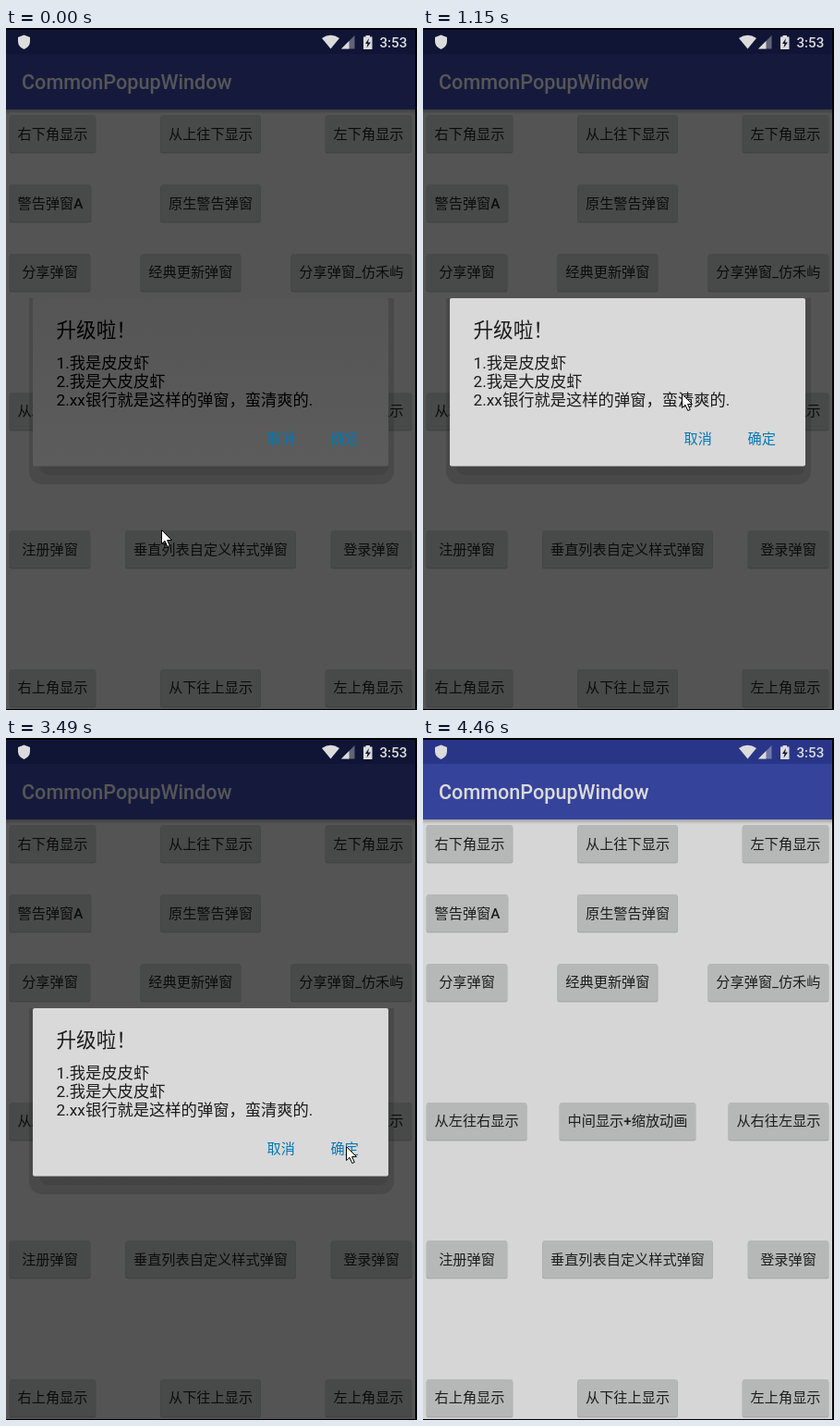
Animation of 445 by 737 pixels, one loop 5010 ms. Source, as an HTML page:

```html
<!DOCTYPE html>
<html lang="zh-CN">
<head>
<meta charset="utf-8">
<style>
  html, body { margin: 0; width: 100%; height: 100%; overflow: hidden; background: #000; }
  svg { display: block; width: 445px; height: 737px; font-family: Roboto, "Noto Sans CJK SC", "Noto Sans CJK", sans-serif; }
  .b { font-weight: 500; }
  #buttons text { font-size: 15.2px; fill: #1c1c1c; }
  #buttons rect { fill: #b6b8b8; }
  #buttons .under { fill: #000; opacity: .2; }
  #dialog text { font-size: 17.3px; }
  #dialog .title { font-size: 21.6px; }
  #dialog .action { font-size: 15.2px; fill: #0277b5; }
</style>
</head>
<body>
<svg viewBox="0 0 445 737">
  <defs>
    <linearGradient id="fall" x2="0" y2="1">
      <stop stop-opacity=".25"/><stop offset="1" stop-opacity="0"/>
    </linearGradient>
    <linearGradient id="dusk" x2="0" y2="1">
      <stop stop-color="#555"/><stop offset="1" stop-color="#5c5c5c"/>
    </linearGradient>
    <clipPath id="below"><rect y="292" width="443" height="210"/></clipPath>
  </defs>
  <rect y="2" width="443" height="734" fill="#d6d6d6"/>
  <rect y="2" width="443" height="26" fill="#293688"/>
  <rect y="28" width="443" height="60" fill="#36439b"/>
  <rect y="88" width="443" height="5" fill="url(#fall)"/>
  <text class="b" x="17" y="66" font-size="21.6" fill="#dbdbdb">CommonPopupWindow</text>
  <g id="buttons"></g>
  <rect id="dim" y="2" width="443" height="734"/>

  <g fill="#dcdcdc">
    <path d="M19.5 7.500L26 10V15Q25.500 20.500 19.500 23Q13.500 20.500 13 15V10Z"/>
    <path d="M342 11Q351.500 4.500 361 11L351.500 22.500Z"/>
    <path d="M377.500 8V22.500H363Z" opacity=".4"/>
    <path d="M371.500 14V22.500H363Z"/>
    <path d="M387 9.500H389.500V8H394V9.500H396.500V23H387Z"/>
    <path d="M393 11L389 17H391.500L390.500 21.500L395 15.500H392Z" fill="#10153a"/>
    <text class="b" x="404.500" y="21" font-size="15.1">3:53</text>
  </g>

  <g id="shadow" clip-path="url(#below)">
    <rect x="25" y="270" width="395" height="223" rx="14" opacity=".13"/>
    <rect x="36" y="280" width="378" height="203" rx="9" opacity=".08"/>
  </g>
  <g id="dialog">
    <rect x="29" y="292" width="385" height="181.500" rx="2" fill="url(#dusk)"/>
    <rect id="panel" x="29" y="292" width="385" height="181.500" rx="2" fill="#d9d9d9"/>
    <text class="title" x="54.500" y="334">升级啦！</text>
    <text x="54.500" y="368">1.我是皮皮虾</text>
    <text x="54.500" y="388">2.我是大皮皮虾</text>
    <text x="54.500" y="408">2.xx银行就是这样的弹窗，蛮清爽的.</text>
    <text class="action" x="282.500" y="449">取消</text>
    <text class="action" x="351.500" y="449">确定</text>
  </g>
  <path id="cursor" d="M.5 .5V15.500L4 12.300L6.800 18.500L9.300 17.400L6.600 11.500H11.500Z" fill="#fff" stroke="#000"/>
</svg>
<script>
const $ = id => document.getElementById(id);
const LOOP = 5010, STEP = 120;
const LEFT = 4, RIGHT = 439, PAD = 17, MIN_WIDTH = 87, ROW = 74.8;

function addButton(label, top, place) {
  const g = document.createElementNS('http://www.w3.org/2000/svg', 'g');
  const baseline = Math.round(top + 25.7), y = Math.ceil(top);
  const text = label.replace(/[A+]/, '<tspan class="b">$&</tspan>');
  g.innerHTML = `<rect class="under" rx="2.5"/><rect rx="2"/><text y="${baseline}">${text}</text>`;
  $('buttons').append(g);
  const [under, face, caption] = g.children;
  const length = caption.getComputedTextLength();
  const w = Math.max(MIN_WIDTH, length + PAD), x = place(w);
  const setBox = (el, grow, drop) => {
    const box = { x: x - grow, y: y + drop, width: w + 2 * grow, height: 40 + grow };
    for (const name in box) el.setAttribute(name, box[name]);
  };
  setBox(under, .5, 1);
  setBox(face, 0, 0);
  caption.setAttribute('x', x + (w - length) / 2);
  return { x, end: x + w };
}

// Labels spread from edge to edge; empty lines keep their height
const rows = `右下角显示 从上往下显示 左下角显示
警告弹窗A 原生警告弹窗
分享弹窗 经典更新弹窗 分享弹窗_仿禾屿

从左往右显示 中间显示+缩放动画 从右往左显示

注册弹窗 垂直列表自定义样式弹窗 登录弹窗

右上角显示 从下往上显示 左上角显示`;

rows.split('\n').forEach((line, i) => {
  if (!line) return;
  const top = 94 + ROW * i;
  const [first, middle, last] = line.split(' ');
  const a = addButton(first, top, () => LEFT);
  const b = last && addButton(last, top, w => RIGHT - w);
  const centre = b ? (a.end + b.x) / 2 : (LEFT + RIGHT) / 2;
  addButton(middle, top, w => centre - w / 2);
});

// Pointer legs: start time, number of steps, destination
const legs = [
  [0, 1, 168, 542], [130, 4, 351, 440], [640, 1, 327, 441], [760, 2, 242, 371],
  [1000, 1, 280, 395], [1430, 2, 375, 434], [1800, 1, 367, 439], [2510, 2, 290, 440],
  [2910, 2, 344, 443], [3180, 1, 359, 442], [3490, 1, 368, 441], [3790, 1, 368, 441],
  [3910, 1, 348, 441], [4070, 2, 297, 636], [4330, 1, 282, 656], [4460, 1, -50, -50]
];

const clamp = v => Math.min(1, Math.max(0, v));
const smooth = v => v * v * (3 - 2 * v);

// The screen refreshes only when a leg takes a step
function sample(t) {
  const i = legs.findLastIndex(leg => leg[0] <= t);
  const [begin, steps, x, y] = legs[i];
  const [, , fromX, fromY] = legs[Math.max(0, i - 1)];
  const k = Math.min(steps, 1 + Math.floor((t - begin) / STEP));
  const mix = (a, b) => Math.round(a + (b - a) * k / steps);
  return { x: mix(fromX, x), y: mix(fromY, y), held: begin + (k - 1) * STEP };
}

function draw(t) {
  const { x, y, held } = sample(t);
  const open = smooth(clamp(held / 240));
  const close = clamp((held - 3685) / 275);
  const ink = 28 * open;
  $('cursor').setAttribute('transform', `translate(${x} ${y})`);
  $('dim').setAttribute('opacity', .603 * (1 - smooth(close)));
  $('panel').setAttribute('opacity', open);
  $('dialog').setAttribute('fill', `rgb(${ink},${ink},${ink})`);
  $('dialog').setAttribute('opacity', clamp(1 - 1.85 * close));
  $('shadow').setAttribute('opacity', close ? 0 : 1);
}

const start = performance.now();
function tick() {
  draw((performance.now() - start) % LOOP);
  requestAnimationFrame(tick);
}
tick();
</script>
</body>
</html>
```
